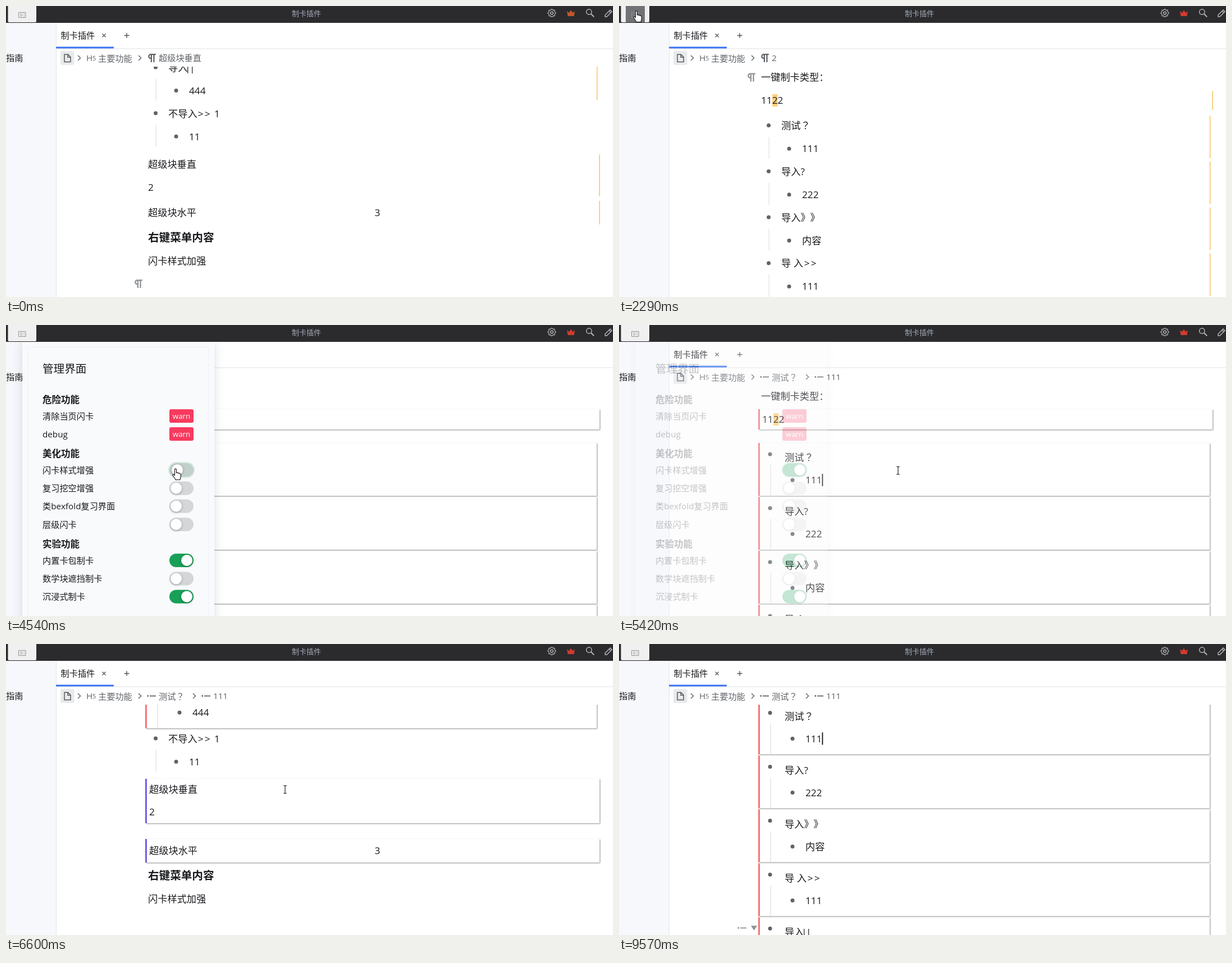
Write an HTML page that moves like this. It is 1081x518 px and loops after 9620 ms.

```html
<!DOCTYPE html>
<html lang="zh-CN">
<head>
<meta charset="utf-8">
<title>制卡插件</title>
<style>
html, body { margin: 0; width: 100%; height: 100%; overflow: hidden; background: #fff; }
svg { display: block; width: 1081px; height: 518px; }
text { font-family: "Open Sans", "Noto Sans CJK SC", "Noto Sans CJK", sans-serif; white-space: pre;
  text-spacing-trim: space-all; font-kerning: none; }
.wide { font-family: "Noto Sans CJK JP", "Noto Sans CJK", sans-serif; }
.card { filter: drop-shadow(1px 1px 1.3px rgba(0, 0, 0, .45)); }
.panel { filter: drop-shadow(0 2px 9px rgba(40, 50, 70, .16)); }
.knob { filter: drop-shadow(0 1px 2px rgba(0, 0, 0, .3)); }
</style>
</head>
<body>
<svg id="stage" viewBox="0 0 1081 518">
  <defs>
    <clipPath id="view"><rect x="90" y="108" width="991" height="410"/></clipPath>
    <path id="para" transform="scale(1.14) translate(-11 -8.5)" fill-rule="evenodd" d="M9 4v4c-1.1 0-2-.9-2-2s.9-2 2-2zM17 2H9C6.8 2 5 3.8 5 6s1.8 4 4 4v5h2V4h2v11h2V4h2z"/>
    <g id="list"><circle cx="-6.3" r="1.4"/><rect x="-3" y="-.9" width="11" height="1.8"/></g>
    <path id="next" d="M-2.5-4.5 2 0-2.5 4.5" fill="none" stroke="#6b6f75" stroke-width="1.6"/>
  </defs>
</svg>
<script>
const DURATION = 9620, NOTCH = 107.6, INK = '#18191c', GREY = '#5f6368';
const stage = document.getElementById('stage');

function add(parent, tag, attrs, content) {
  const el = document.createElementNS('http://www.w3.org/2000/svg', tag);
  for (const key in attrs) el.setAttribute(key, attrs[key]);
  if (content) el.textContent = content;
  parent.appendChild(el);
  return el;
}
const group = (parent, attrs = {}) => add(parent, 'g', attrs);
const rect = (parent, x, y, width, height, fill, attrs) =>
  add(parent, 'rect', { x, y, width, height, fill, ...attrs });
const path = (parent, d, attrs) => add(parent, 'path', { d, fill: 'none', ...attrs });
const icon = (parent, id, x, y, fill = GREY) => add(parent, 'use', { href: '#' + id, x, y, fill });
const dot = (parent, cx, cy) => add(parent, 'circle', { cx, cy, r: 3.5, fill: GREY });

// y is the visual middle of the line
function label(parent, x, y, str, size = 17.2, fill = INK, attrs = {}) {
  return add(parent, 'text', { x, y: y + size * .36, 'font-size': size, fill, ...attrs }, str);
}
const bold = { 'font-weight': 700 };

function show(el, visible) {
  el.style.display = visible ? '' : 'none';
}

// ---- document ----
// title, tail character, tail offset, tail pitch, child
const ITEMS = [
  { title: '测试', tail: '？', at: 34.4, child: '111' },
  { title: '导入?', child: '222' },
  { title: '导入》》', child: '内容' },
  { title: '导 入', tail: '>>', at: 40.8, pitch: 12, child: '111' },
  { title: '导入', tail: '||', at: 30, pitch: 8, child: '444' },
  { title: '不导入', tail: '>>', at: 52.8, pitch: 12, child: '11' }
];

function itemText(doc, i, x, y) {
  const { title, tail = '', at, pitch } = ITEMS[i];
  label(doc, x, y, title);
  [...tail].forEach((c, k) =>
    label(doc, x + at + (k && pitch), y, c, 17.2, INK, c === '？' ? { class: 'wide' } : {}));
  if (i === 5) label(doc, x + 82, y, '1');
}

function plainItem(doc, i, y) {
  dot(doc, 266.5, y - .5);
  itemText(doc, i, 289, y);
  rect(doc, 266.5, y + 20, 1.2, 39, '#e0e1e3');
  dot(doc, 303, y + 41);
  label(doc, 326, y + 41, ITEMS[i].child);
}

function cardItem(doc, i, y) {
  dot(doc, 269, y - 6);
  itemText(doc, i, 295, y);
  rect(doc, 269.5, y + 13, 1.2, 55, '#dcdde0');
  dot(doc, 309, y + 40);
  label(doc, 332, y + 40, ITEMS[i].child);
}

function intro(doc, x) {
  label(doc, 253, 127, '一键制卡类型：');
  rect(doc, x + 20, 157, 9.5, 22, '#ffcf7d');
  label(doc, x, 168, '1122');
}

function ending(doc, x, ys) {
  label(doc, x, ys[0], '超级块垂直');
  label(doc, x, ys[1], '2');
  label(doc, x, ys[2], '超级块水平');
  label(doc, 656.5, ys[2], '3');
  label(doc, 253, ys[3], '右键菜单内容', 19.6, INK, bold);
  label(doc, 253, ys[4], '闪卡样式加强');
}

function bar(doc, x, y, height) {
  rect(doc, x, y, 2, height, '#f9d084', { rx: 1 });
}

function card(doc, y, height, right, color) {
  rect(doc, 249, y, right - 249, height, '#fff', { class: 'card' });
  rect(doc, 248, y, 2.8, height, color);
}

rect(stage, 0, 0, 1081, 518, '#fff');
const view = group(stage, { 'clip-path': 'url(#view)' });
const scroller = group(view);
const plain = group(scroller), styled = group(scroller);

intro(plain, 253);
bar(plain, 1056, 151, 34);
ITEMS.forEach((_, i) => {
  const y = 213 + 81.75 * i;
  plainItem(plain, i, y);
  if (i < 5) bar(plain, 1051.7, y - 18, 76);
});
bar(plain, 1056, 694.5, 75);
bar(plain, 1056, 777, 42.5);
ending(plain, 253, [712.5, 753.5, 798.5, 842.5, 884.5]);

card(styled, 150, 36, 1057, '#f26d6d');
intro(styled, 255);
for (let i = 0; i < 5; i++) {
  card(styled, 210 + 96 * i, 94, 1052, '#f26d6d');
  cardItem(styled, i, 236 + 96 * i);
}
plainItem(styled, 5, 706.5);
card(styled, 778, 79, 1057, '#6b52e0');
card(styled, 885, 42, 1057, '#6b52e0');
ending(styled, 255, [797, 837, 906, 950, 992]);

const caretTwo = rect(plain, 263.5, 743, 1.6, 21, '#111');
const caretOne = rect(styled, 361.5, 265, 1.8, 22, '#111');

// ---- block gutter ----
const gutters = group(stage);
function gutter(from, to, draw) {
  const el = group(gutters);
  draw(el);
  return { el, from, to };
}
const mark = y => el => icon(el, 'para', 236, y, '#8f9296');
const gutterList = [
  gutter(0, 830, mark(494.5)),
  gutter(2020, 5340, mark(127)),
  gutter(6480, 6600, el => {
    mark(260)(el);
    rect(el, 208.5, 254, 12, 12, 'none', { stroke: '#8f9296', 'stroke-width': 1.6 });
  }),
  gutter(8560, DURATION, el => {
    icon(el, 'list', 219, 505.5, '#8f9296');
    path(el, 'M235 501.5h11l-5.5 8.5z', { fill: '#8f9296' });
  })
];

// ---- side bar, tab and breadcrumb ----
rect(stage, 0, 30, 89, 488, '#f6f8fb');
rect(stage, 89, 30, 1, 488, '#e3e6eb');
label(stage, 0, 92, '指南', 15.3);
rect(stage, 90, 75.5, 991, 1, '#dfe1e5');
rect(stage, 89, 72.5, 103, 3, '#3573f0', { rx: 1 });
label(stage, 97.5, 53, '制卡插件', 15.2);
path(stage, 'M171.5 49.5l6 6m0-6l-6 6M210.5 52.5h9m-4.5-4.5v9', { stroke: '#4c4f54', 'stroke-width': 1.3 });

rect(stage, 97, 80, 24.5, 25, '#e9eaeb', { rx: 3 });
path(stage, 'M104 86.3h6.5l4.5 4.5v8.7h-11zM110 86.5v4.8h5', { stroke: '#55585d', 'stroke-width': 1.5 });
icon(stage, 'next', 130.5, 92.5);
label(stage, 143, 92.5, 'H', 15.2, GREY);
label(stage, 154, 93.5, '5', 11, GREY);
label(stage, 164, 93.5, '主要功能', 15.2, GREY);
icon(stage, 'next', 238.5, 92.5);

function crumb(text) {
  const el = group(stage);
  icon(el, 'para', 260, 92.5);
  label(el, 272, 93, text, 15.2, GREY);
  return el;
}
const crumbs = [crumb('超级块垂直'), crumb('2'), group(stage)];
icon(crumbs[2], 'list', 259, 92.5);
label(crumbs[2], 272, 93.5, '测试', 15.2, GREY);
label(crumbs[2], 302.4, 93.5, '？', 15.2, GREY, { class: 'wide' });
icon(crumbs[2], 'next', 335.5, 92.5);
icon(crumbs[2], 'list', 356, 92.5);
label(crumbs[2], 369, 93, '111', 15.2, GREY);

// ---- settings panel ----
const panel = group(stage);
rect(panel, 29, 28, 342, 520, '#f9fafc', { class: 'panel' });
rect(panel, 38.5, 39.5, 322, 500, 'none', { stroke: '#eff1f4' });
label(panel, 65, 77.5, '管理界面', 19.6);
[[133, '危险功能'], [229.5, '美化功能'], [390.5, '实验功能']].forEach(([y, s]) => label(panel, 65, y, s, 16.5, INK, bold));

[[162, '清除当页闪卡'], [194, 'debug']].forEach(([y, s]) => {
  label(panel, 65, y + .5, s, 15.2);
  rect(panel, 291, y - 12, 43, 24, '#f73a5e', { rx: 3 });
  label(panel, 312.5, y, 'warn', 13.4, '#fff', { 'text-anchor': 'middle' });
});

function toggle(y, text, on) {
  label(panel, 65, y + .5, text, 15.2);
  const ring = rect(panel, 290, y - 13, 45, 26, 'none', { rx: 13, stroke: '#d3e8de', 'stroke-width': 2 });
  rect(panel, 291, y - 12, 43, 24, '#d5d6d8', { rx: 12 });
  const fill = rect(panel, 291, y - 12, 43, 24, '#18a058', { rx: 12 });
  const knob = add(panel, 'circle', { cy: y, r: 10, fill: '#fff', class: 'knob' });
  const set = (value, focus) => {
    fill.setAttribute('opacity', value);
    knob.setAttribute('cx', 303 + 19 * value);
    show(ring, focus);
  };
  set(on, false);
  return set;
}
const setStyle = toggle(258, '闪卡样式增强', 0);
toggle(290.5, '复习挖空增强', 0);
toggle(322.5, '类bexfold复习界面', 0);
toggle(355, '层级闪卡', 0);
toggle(419, '内置卡包制卡', 1);
toggle(451.5, '数学块遮挡制卡', 0);
toggle(483.5, '沉浸式制卡', 1);

// ---- title bar ----
rect(stage, 0, 0, 1081, 30, '#2b2b2e');
label(stage, 509, 13.5, '制卡插件', 13, '#a3aab6');
rect(stage, 3.5, -2, 50.5, 31, '#f0f0f0', { rx: 2 });
const hover = rect(stage, 12, 0, 34, 29, '#717276');
path(stage, 'M22.5 11.5h12.5v9h-12.5zM25 14.5h4.5m-4.5 3h4.5m2-3h1.5m-1.5 3h1.5', { stroke: '#909193' });

const tools = { stroke: '#b9babd', 'stroke-width': 1.4 };
let gear = '';
for (let i = 0; i < 32; i++) {
  const a = (i - .5) * Math.PI / 16, r = i % 4 < 2 ? 7 : 5.6;
  gear += (i ? 'L' : 'M') + (972 + r * Math.cos(a)).toFixed(1) + ' ' + (12.5 + r * Math.sin(a)).toFixed(1);
}
path(stage, gear + 'z', { ...tools, 'stroke-width': 1.2 });
add(stage, 'circle', { cx: 972, cy: 12.5, r: 2.4, fill: 'none', ...tools });
const crown = path(stage, 'M999 9l3.5 3.3 3.5-4.8 3.5 4.8L1013 9l-1.5 9h-11z');
add(stage, 'circle', { cx: 1038.3, cy: 10.5, r: 4.7, fill: 'none', ...tools });
path(stage, 'M1041.8 14l5.4 5.4', { ...tools, 'stroke-width': 2 });
path(stage, 'M1067 19v-3l9-9 3 3-9 9zM1074 9l3 3', tools);

// ---- pointer ----
const pointer = group(stage);
const outline = { fill: '#fff', stroke: '#111', 'stroke-width': 1.1, 'stroke-linejoin': 'round' };
const shapes = {
  arrow: path(pointer, 'M0 0V13.8L3.2 11 5.4 16 7.6 15 5.5 10.2H9.8Z', outline),
  hand: path(pointer, 'M-1.6 11.8V1.2C-1.6-.6 1.4-.6 1.4 1.2V7.2C1.8 6.2 4 6.4 4.2 7.8 4.8 7 6.6 7.2 6.8 8.6 7.6 8 9.2 8.4 9.2 10V13.5C9.2 16 8 17 8 19.5H-.2C-.4 17.5-3.4 14.5-5 11.6-5.6 10-3.8 9-2.8 10.2Z', outline),
  beam: path(pointer, 'M-3-7H-1L0-6 1-7H3M0-6V6M-3 7H-1L0 6 1 7H3', { stroke: '#222', 'stroke-width': 1.2 })
};

// ---- timeline ----
const SCROLL = [[0, 4], [1090, 3], [1160, 1], [1370, 0], [5880, 1], [5940, 3], [6040, 6],
  [6600, 5], [6740, 4], [7140, 3], [7280, 2], [7660, 1]];
const PANEL = [[0, 0], [2940, 1], [5340, .6], [5400, .25], [5490, 0]];
const MOVES = [[170, 920, 470], [300, 640, 370], [400, 430, 285], [490, 345, 345], [1700, 345, 345],
  [2290, 31, 9], [3140, 31, 9], [3480, 336, 249], [3680, 336, 249], [3980, 302, 256],
  [4800, 302, 256], [5080, 497, 259], [7990, 497, 259], [8680, 1030, 522]];

const held = (steps, t) => steps.filter(s => s[0] <= t).pop()[1];
const smooth = p => { p = Math.min(1, Math.max(0, p)); return p * p * (3 - 2 * p); };

function pointerAt(t) {
  const i = Math.max(1, MOVES.findIndex(m => m[0] > t));
  const [t0, x0, y0] = MOVES[i - 1], [t1, x1, y1] = MOVES[i];
  const p = smooth((t - t0) / (t1 - t0));
  return [x0 + (x1 - x0) * p, y0 + (y1 - y0) * p];
}

function pointerShape(x, y, open) {
  if (y < 30) return x < 54 ? 'hand' : 'arrow';
  if (open && x < 371) return x > 290 && x < 334 && y > 246 && y < 270 ? 'hand' : 'arrow';
  return x > 200 && y > 108 ? 'beam' : 'arrow';
}

function draw(t) {
  scroller.setAttribute('transform', `translate(0 ${-held(SCROLL, t) * NOTCH})`);
  const cards = t >= 4480;
  show(plain, !cards);
  show(styled, cards);
  show(caretTwo, t >= 770 && t < 1370);
  show(caretOne, t >= 5340 && (t < 7990 || t >= 8490 && t < 9020 || t >= 9570));
  gutterList.forEach(g => show(g.el, t >= g.from && t < g.to));
  const place = t < 830 ? 0 : t < 5340 ? 1 : 2;
  crumbs.forEach((el, i) => show(el, i === place));

  const opacity = held(PANEL, t);
  panel.setAttribute('opacity', opacity);
  show(panel, opacity > 0);
  setStyle(smooth((t - 4480) / 300), t >= 4410);
  crown.setAttribute('fill', t < 1700 ? '#c4592b' : '#d23b2e');

  const visible = t >= 170 && t < 8680;
  show(pointer, visible);
  let over = false;
  if (visible) {
    const [x, y] = pointerAt(t), shape = pointerShape(x, y, opacity > 0);
    pointer.setAttribute('transform', `translate(${x} ${y})`);
    for (const key in shapes) show(shapes[key], key === shape);
    over = y < 29 && x < 54;
  }
  show(hover, over);
  hover.setAttribute('fill', t >= 2680 ? '#8c8d91' : '#717276');
}

function tick() {
  draw(performance.now() % DURATION);
  requestAnimationFrame(tick);
}
tick();
</script>
</body>
</html>
```
